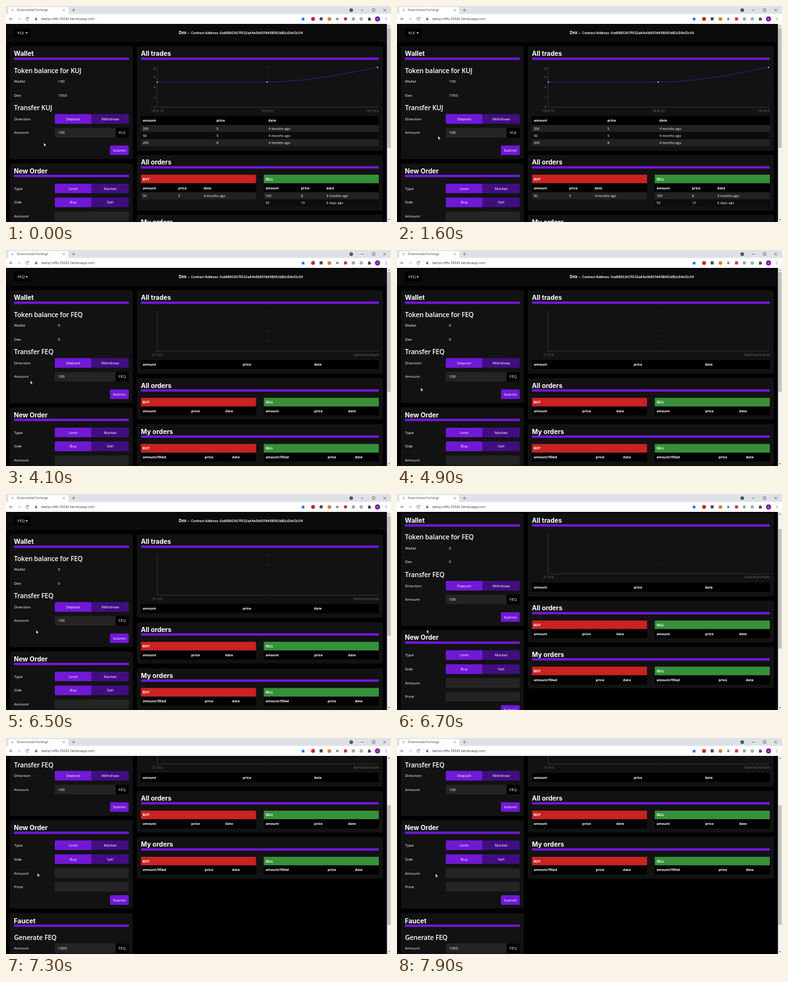
Animation of 600 by 338 pixels, one loop 8 s. Source, as an HTML page:

```html
<!DOCTYPE html>
<html lang="en">
<head>
<meta charset="utf-8">
<title>Decentralized Exchange</title>
<style>
  html, body { margin: 0; width: 100%; height: 100%; overflow: hidden; background: #000; }
  svg { display: block; width: 100vw; height: 100vh; }
  text { font-family: "Open Sans", "Noto Sans", sans-serif; white-space: pre; }
  .brand { font-family: Inter, sans-serif; }

  .before, .after, .menu, .arrow, .hand { animation: 8s step-end infinite; }
  .before { animation-name: before; }
  .after { animation-name: after; }
  .menu { animation-name: menu; }
  .arrow { animation-name: arrow; }
  .hand { animation-name: hand; }
  .page { animation: scroll 8s ease-out infinite; }
  .thumb { animation: thumb 8s ease-out infinite; }
  .cursor { animation: move 8s ease-in-out infinite; }

  @keyframes before { 0% { visibility: visible } 46.25%, 100% { visibility: hidden } }
  @keyframes after { 0% { visibility: hidden } 46.25%, 100% { visibility: visible } }
  @keyframes menu { 0% { visibility: hidden } 35% { visibility: visible } 43.75%, 100% { visibility: hidden } }
  @keyframes hand { 0% { visibility: hidden } 33.75% { visibility: visible } 45%, 100% { visibility: hidden } }
  @keyframes arrow { 0% { visibility: visible } 33.75% { visibility: hidden } 45%, 100% { visibility: visible } }

  @keyframes scroll {
    0%, 82.5% { transform: translateY(0) }
    84.375%, 85% { transform: translateY(-39.2px) }
    86.875%, 89.375% { transform: translateY(-78.4px) }
    91.25%, 100% { transform: translateY(-117.6px) }
  }
  @keyframes thumb {
    0%, 82.5% { transform: translateY(0) }
    84.375%, 85% { transform: translateY(23.5px) }
    86.875%, 89.375% { transform: translateY(47px) }
    91.25%, 100% { transform: translateY(70.5px) }
  }
  @keyframes move {
    0%, 8% { transform: translate(59px, 214px) }
    20%, 24% { transform: translate(64px, 203.5px) }
    33.75%, 36% { transform: translate(29px, 42px) }
    41.25%, 44% { transform: translate(50px, 69.5px) }
    53%, 61.25% { transform: translate(37px, 215.5px) }
    72%, 81.25% { transform: translate(47px, 213px) }
    87.5% { transform: translate(45.5px, 211px) }
    98.75%, 100% { transform: translate(60px, 212.5px) }
  }
</style>
</head>
<body>
<svg id="stage" viewBox="0 0 600 338"></svg>
<script>
const PURPLE = '#7118d6', DEEP = '#410e82', CARD = '#121212', FIELD = '#242424';
const TOKENS = ['KUJ', 'FEQ', 'UQI', 'XJQ'];

const rect = (x, y, w, h, fill, r = 0) =>
  `<rect x="${x}" y="${y}" width="${w}" height="${h}" rx="${r}" fill="${fill}"/>`;
const dot = (x, y, r, fill) => `<circle cx="${x}" cy="${y}" r="${r}" fill="${fill}"/>`;
const path = (d, stroke, w = 0.7, more = '') =>
  `<path d="${d}" fill="none" stroke="${stroke}" stroke-width="${w}" ${more}/>`;
const group = (cls, ...parts) => `<g class="${cls}">${parts.join('')}</g>`;

// y is the middle of the capitals
const text = (x, y, s, { size = 6.1, weight = 400, fill = '#fff', anchor = 'start', cls = '', gap = 0 } = {}) =>
  `<text x="${x}" y="${y + size * 0.36}" font-size="${size}" font-weight="${weight}" fill="${fill}"
    text-anchor="${anchor}" class="${cls}" letter-spacing="${gap}">${s}</text>`;
const small = (x, y, s, weight = 400) => text(x, y, s, { size: 5.3, weight });
const title = (x, y, s) => text(x, y, s, { size: 10.1, weight: 700, cls: 'brand' });
const subtitle = (y, s) => text(12.5, y, s, { size: 10.3, weight: 600, gap: -0.15 });

const card = (x, y, w, h, s) =>
  rect(x, y, w, h, CARD, 2) + title(x + 6.3, y + 11.7, s) +
  rect(x + 6.3, y + 17.6, w - 12.6, 3.8, PURPLE);

const centered = (x, y, s) => text(x, y, s, { anchor: 'middle' });
const button = y => rect(162, y - 7.5, 29.3, 15, PURPLE, 1.5) + centered(176.6, y, 'Submit');
const label = (y, s) => text(12.5, y, s);
const toggle = (y, s, on, off) =>
  label(y, s) + rect(76, y - 7.5, 115.3, 15, DEEP, 1.5) + rect(76, y - 7.5, 57, 15, PURPLE, 1.5) +
  centered(104.7, y, on) + centered(162.3, y, off);
const field = (y, s, value = '', unit = '') =>
  label(y, s) + rect(76, y - 7.5, 115.3, 15, FIELD, 1.5) + text(81, y, value) +
  (unit && rect(170.7, y - 7.5, 20.6, 15, '#000', 1.5) + centered(181, y, unit));

function table(x, y, w, heads, cols, rows) {
  let out = rect(x, y, w, 14, '#000');
  heads.forEach((s, i) => out += small(cols[i], y + 7.2, s, 700));
  rows.forEach((row, r) => {
    const top = y + 14 + r * 11.1;
    out += rect(x, top, w, 11.1, r % 2 ? '#0c0c0c' : '#222');
    row.forEach((s, i) => out += small(cols[i], top + 5.4, s));
  });
  return out;
}

function orders(y, name, first, cols, buy = [], sell = []) {
  const side = (x, s, fill, rows) =>
    rect(x, y + 31, 179.3, 13.7, fill) + small(x + 2.7, y + 37.8, s, 700) +
    table(x, y + 44.5, 179.3, [first, 'price', 'date'], cols.map(c => x + c), rows);
  const lines = Math.max(buy.length, sell.length);
  return card(204, y, 383.4, 65 + lines * 11.1, name) +
    side(210.3, 'BUY', '#cb2222', buy) + side(401.7, 'SELL', '#369039', sell);
}

function trades(cols, rows, plot) {
  const grid = path('M235.5 95.5H580M235.5 111H580M235.5 127H580M235.5 142.5H580M407.5 95.5V158M579.5 95.5V158',
    '#242424', 0.5, 'stroke-dasharray="1 1"');
  return card(204, 63, 383.4, 130.5 + rows.length * 11.1, 'All trades') + grid +
    path('M235.5 95.5V158.2H580.5', '#484848', 0.6) + plot +
    table(210.3, 172.2, 370.7, ['amount', 'price', 'date'], cols, rows);
}

const axis = (x, y, s, anchor = 'middle') => text(x, y, s, { size: 5.9, fill: '#686868', anchor });

const curve =
  path('M235.8 119H407C464 119 522 107.5 579 96', '#5c14a8', 0.8) +
  [[235.8, 119], [407, 119], [579, 96]].map(([x, y]) => dot(x, y, 1.1, '#d9c4f2')).join('') +
  [[8, 98], [6, 111], [4, 127], [2, 142.5], [0, 158]].map(([s, y]) => axis(233, y, s, 'end')).join('') +
  axis(236, 163.5, '18:8:16') + axis(407.5, 163.5, '18:8:52') + axis(581, 163.5, '18:10:4', 'end');
const blank = axis(236, 163.5, '21:0:0') + axis(581, 163.5, 'NaN:NaN:NaN', 'end');

const wallet = (token, own, dex) => [
  text(18, 42.3, token),
  subtitle(101, 'Token balance for ' + token),
  text(81, 118, own), text(81, 139.5, dex),
  subtitle(159.7, 'Transfer ' + token),
  field(198.3, 'Amount', '100', token),
  subtitle(430, 'Generate ' + token),
  field(446.5, 'Amount', '1000', token)
].join('');

const old = '4 months ago';
const page = group('page',
  rect(0, 28, 594, 28.5, '#0b0b0b'),
  rect(12.7, 35, 25.6, 14.3, '#000', 1.5),
  '<path d="M30.2 41.2h4l-2 2.1z" fill="#fff"/>',
  text(269.3, 42, 'Dex -', { size: 6.4, weight: 700, cls: 'brand' }),
  text(288.3, 42.3, 'Contract Address: 0xd6B6CA57f632aA4e0b807d45B083dB2cD8ef2c54',
    { size: 4.9, weight: 700, fill: '#eee', cls: 'brand' }),
  card(6, 63, 191.7, 176.5, 'Wallet'),
  label(118, 'Wallet'), label(139.5, 'Dex'),
  toggle(176.7, 'Direction', 'Deposit', 'Withdraw'),
  button(225.7),
  card(6, 246.4, 191.7, 138, 'New Order'),
  toggle(285.4, 'Type', 'Limit', 'Market'),
  toggle(307.2, 'Side', 'Buy', 'Sell'),
  field(329, 'Amount'), field(350.2, 'Price'), button(371.2),
  card(6, 391.8, 191.7, 95, 'Faucet'),
  group('before',
    wallet(TOKENS[0], '150', '1950'),
    trades([213, 328, 409], [['200', '5', old], ['50', '5', old], ['200', '8', old]], curve),
    orders(233, 'All orders', 'amount', [2.7, 58, 97.6],
      [['50', '5', old]], [['100', '8', old], ['50', '10', '6 days ago']]),
    orders(326.5, 'My orders', 'amount/filled', [2.7, 99.5, 142])),
  group('after',
    wallet(TOKENS[1], '0', '0'),
    trades([213, 369, 480], [], blank),
    orders(200.3, 'All orders', 'amount', [2.7, 78.5, 131.5]),
    orders(272.5, 'My orders', 'amount/filled', [2.7, 99.5, 142])),
  group('menu',
    rect(12.7, 51.5, 62.5, 56, '#000', 1.5),
    rect(13, 54.2, 62, 12.5, PURPLE), rect(13, 66.7, 62, 12.5, DEEP),
    ...TOKENS.map((s, i) => text(23, 60.5 + i * 12.6, s)))
);

const GREY = '#5f6368';
const chrome = [
  rect(0, 0, 600, 13, '#dee1e6'),
  rect(3.5, 1.5, 93.5, 14, '#fff', 2.5),
  rect(0, 12.5, 600, 15.5, '#fff'),
  dot(10.2, 6.5, 2.2, '#d3d8dd'),
  text(17, 6.4, 'Decentralized Exchange', { size: 4.4, fill: '#45494d' }),
  path('M88.7 5l3 3m0-3l-3 3', GREY, 0.6),
  path('M102.7 6.5h5M105.2 4v5', GREY, 0.7),
  dot(538, 6.5, 2.7, '#3c4043'), path('M536.8 6l1.2 1.2L539.2 6', '#fff', 0.6),
  path('M553.3 6.5h4M571 4.5h3.8v3.8H571zM588.2 4.5l4 4m0-4l-4 4', '#333', 0.6),
  path('M10.5 20.2H5.8M8 18l-2.2 2.2L8 22.4', GREY, 0.8),
  path('M18.2 20.2h4.7M20.7 18l2.2 2.2-2.2 2.2', '#b4b7ba', 0.8),
  path('M35 18.7A2.2 2.2 0 1 0 35.3 21M35.3 17.5v1.8h-1.8', GREY, 0.8),
  rect(45.4, 19.6, 3.2, 2.7, GREY, 0.4), path('M46 19.7v-1a1 1 0 0 1 2 0v1', GREY, 0.6),
  text(55, 20.2, 'damp-cliffs-35020.herokuapp.com', { size: 5.2, fill: '#303134' }),
  '<path d="M463 17l.95 2.2 2.35.2-1.8 1.5.55 2.3-2.05-1.2-2.05 1.2.55-2.3-1.8-1.5 2.35-.2z" fill="#1a65e8"/>',
  dot(478.5, 20.2, 3, '#cf2029'), rect(488.8, 17.8, 4.8, 4.8, '#4a4d50', 0.5),
  dot(504, 20.2, 2.8, '#e27625'), dot(516.3, 20.2, 2, '#7c8c80'),
  rect(526.8, 17.9, 4.6, 4.6, '#c8322e'),
  dot(541.3, 20.2, 2.6, '#a3a6a8'), dot(553.7, 20.2, 2.7, '#aaadaf'),
  rect(564, 18.8, 4, 4, '#4a4d50', 0.5), dot(566, 18.5, 1.1, '#4a4d50'), dot(568.2, 20.8, 1, '#4a4d50'),
  dot(579, 20.2, 4, '#7b1fa2'),
  text(579, 20.2, 'V', { size: 4, anchor: 'middle' }),
  [18.2, 20.2, 22.2].map(y => dot(592.3, y, 0.6, GREY)).join('')
].join('');

const scrollbar =
  rect(593.7, 28, 6.3, 310, '#f1f1f1') +
  '<path d="M595.4 32.2l1.5-1.7 1.5 1.7zM595.4 333.8l1.5 1.7 1.5-1.7z" fill="#555"/>' +
  group('thumb', rect(594.2, 34.8, 5.3, 187, '#c1c1c1'));

const cursor = group('cursor',
  '<path class="arrow" d="M0 0V5.4L1.25 4.3 2.1 6.2 3 5.8 2.2 4H3.9Z" fill="#fff" stroke="#000" stroke-width=".35"/>',
  `<path class="hand" d="M-.6 .5Q0 -.4 .6 .5V2.5L2.9 3.1Q3.3 3.3 3.2 4L2.7 6.6H-.4L-2 4.2Q-1.9 3.2 -.6 4Z"
    fill="#fff" stroke="#000" stroke-width=".35"/>`);

document.getElementById('stage').innerHTML = rect(0, 0, 600, 338, '#000') + page + scrollbar + chrome + cursor;
</script>
</body>
</html>
```
